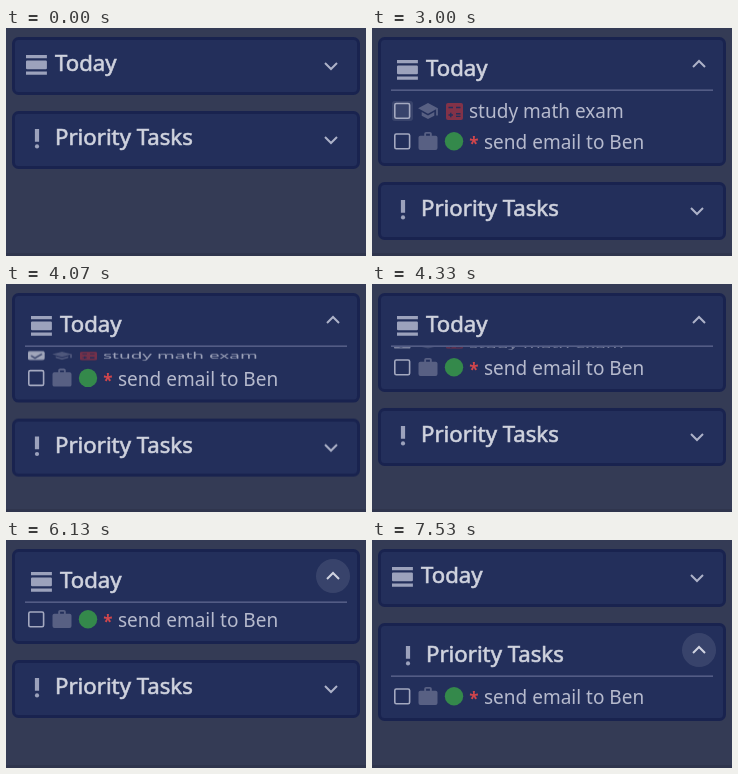
These frames come from a looping animation (360x228 px, 8000 ms). An HTML page:

```html
<!DOCTYPE html>
<html lang="en">
<head>
<meta charset="utf-8">
<title>Task list</title>
<style>
  @property --shift { syntax: "<length>"; inherits: true; initial-value: 0px; }

  html, body { margin: 0; width: 100%; height: 100%; overflow: hidden; background: #343b55; }
  svg {
    display: block; width: 360px; height: 228px;
    font-family: "Noto Sans", "Open Sans", sans-serif;
    animation: shift 8s step-end infinite;
  }

  .card { fill: #232f5b; stroke: #19234f; stroke-width: 3; }
  /* The thin outline gives a medium weight. */
  .title { font-size: 22.2px; fill: #d0d3de; stroke: #d0d3de; stroke-width: .6; }
  .task { font-size: 19px; fill: #b6bacd; }
  .star { font-size: 17px; font-weight: 700; fill: #d2464c; }
  .icon { fill: #9ca2bc; }
  .dim { fill: #586083; }
  .rule { fill: #606890; }
  .box { fill: none; stroke: #a4a9c0; stroke-width: 1.6; }
  .chevron { fill: none; stroke: #adb2c8; stroke-width: 2; }
  .halo { fill: #fff; opacity: 0; }

  .today *, .priority * { animation: 8s step-end infinite; }

  /* Height gained by the first card; everything below follows it. */
  @keyframes shift {
    0% { --shift: 0px; }
    14.125% { --shift: 71px; }
    45.875% { --shift: 71px; animation-timing-function: linear; }
    49.125% { --shift: 65px; animation-timing-function: linear; }
    51.625% { --shift: 46px; animation-timing-function: linear; }
    53.375% { --shift: 44px; animation-timing-function: linear; }
    54.125% { --shift: 41px; animation-timing-function: ease-out; }
    61.625% { --shift: 37px; }
    78.375% { --shift: 0px; }
  }

  .today .card { height: calc(55px + var(--shift)); }
  .today .second { transform: translateY(calc(var(--shift) + 34px)); }
  .priority { transform: translateY(calc(74px + var(--shift))); }

  .today .head { animation-name: today-head; }
  .today .body { animation-name: today-body; }
  .today .arrow { animation-name: today-arrow; }
  .today .chevron { animation-name: today-glow; }
  .today .hover { animation-name: today-hover; }
  .today .ripple { animation-name: ripple; }
  .today .first { transform-origin: 0 0; animation-name: collapse; }
  .today .focus { animation-name: focus; }
  .today .checked { opacity: 0; animation-name: check; }

  .priority .card { height: 55px; animation-name: priority-card; }
  .priority .head { animation-name: priority-head; }
  .priority .body { animation-name: priority-body; }
  .priority .arrow { animation-name: priority-arrow; }
  .priority .chevron { animation-name: priority-glow; }
  .priority .hover { animation-name: priority-hover; }

  @keyframes today-head {
    0%, 78.375% { transform: none; }
    14.125% { transform: translate(5px, 5px); }
  }
  @keyframes today-body {
    0%, 78.375% { opacity: 0; }
    14.125% { opacity: 1; }
  }
  @keyframes today-arrow {
    0%, 78.375% { transform: translate(325px, 38px); }
    14.125% { transform: translate(327px, 36px) rotate(180deg); }
  }
  @keyframes today-glow {
    0%, 25%, 83.375% { stroke: #adb2c8; }
    6.625%, 18.375%, 23.375%, 71.625% { stroke: #bfc3d4; }
    10%, 73.375% { stroke: #d0d3e0; }
  }
  @keyframes today-hover {
    0% { opacity: 0; }
    76.625% { opacity: .1; }
    81.625% { opacity: .07; }
    82.5% { opacity: .03; }
    83.375% { opacity: 0; }
  }
  @keyframes ripple {
    0%, 16.625% { opacity: 0; }
    15.875% { opacity: .06; }
  }
  @keyframes collapse {
    0% { transform: translateY(83px); opacity: 1; }
    45.875% { transform: translateY(83px); opacity: 1; animation-timing-function: linear; }
    49.125% { transform: translateY(77.5px) scaleY(.55); opacity: .95; animation-timing-function: linear; }
    54.125% { transform: translateY(61px) scaleY(.4); opacity: .65; animation-timing-function: ease-out; }
    61.625%, 100% { transform: translateY(57px) scaleY(0); opacity: 0; }
  }
  @keyframes focus {
    0%, 45.875% { opacity: 0; }
    37.5% { opacity: .1; }
  }
  @keyframes check {
    0% { opacity: 0; }
    44.125%, 100% { opacity: 1; }
  }

  @keyframes priority-card {
    0% { height: 55px; }
    90.875%, 100% { height: 95px; }
  }
  @keyframes priority-head {
    0% { transform: none; }
    90.875%, 100% { transform: translate(5px, 5px); }
  }
  @keyframes priority-body {
    0% { opacity: 0; }
    90.875%, 100% { opacity: 1; }
  }
  @keyframes priority-arrow {
    0% { transform: translate(325px, 38px); }
    90.875%, 100% { transform: translate(327px, 36px) rotate(180deg); }
  }
  @keyframes priority-glow {
    0% { stroke: #adb2c8; }
    85.875%, 100% { stroke: #d0d3e0; }
  }
  @keyframes priority-hover {
    0% { opacity: 0; }
    89.125%, 100% { opacity: .1; }
  }
</style>
</head>
<body>
<svg viewBox="0 0 360 228">
  <defs>
    <clipPath id="below-rule"><rect y="63" width="360" height="165"/></clipPath>
    <!-- Rows are drawn around their vertical centre. -->
    <g id="email">
      <rect class="box" x="22.8" y="-8" width="14.8" height="14.8" rx="1.5"/>
      <path class="dim" transform="translate(44.6 -12) scale(.95)"
        d="M20 6h-4V4a2 2 0 0 0-2-2h-4a2 2 0 0 0-2 2v2H4a2 2 0 0 0-2 2v11a2 2 0 0 0 2 2h16a2 2 0 0 0 2-2V8a2 2 0 0 0-2-2zm-6 0h-4V4h4z"/>
      <circle cx="82" cy="-.7" r="9.2" fill="#34894b"/>
      <text class="star" x="97.3" y="8">*</text>
      <text class="task" x="112" y="7">send email to Ben</text>
    </g>
  </defs>

  <rect width="360" height="228" fill="#343b55"/>
  <rect y="225" width="360" height="3" fill="#2f354d"/>

  <g class="today">
    <rect class="card" x="7.5" y="10.5" width="345" rx="5"/>
    <g class="head">
      <path class="icon" transform="translate(17.8 23.7) scale(1.1)"
        d="M2 3h19v3H2zM2 18h19v3H2zM3 8h17a1 1 0 0 1 1 1v6a1 1 0 0 1-1 1H3a1 1 0 0 1-1-1V9a1 1 0 0 1 1-1z"/>
      <text class="title" x="49" y="43">Today</text>
    </g>
    <circle class="halo ripple" cx="322" cy="40" r="20"/>
    <g class="arrow">
      <circle class="halo hover" r="17"/>
      <path class="chevron" d="M-6-3L0 3L6-3"/>
    </g>
    <g class="body">
      <rect class="rule" x="19" y="61.5" width="322" height="1.3"/>
      <g clip-path="url(#below-rule)">
        <g class="first">
          <rect class="halo focus" x="20" y="-10" width="21" height="20" rx="3"/>
          <rect class="box" x="22.8" y="-7.5" width="14.8" height="14.8" rx="1.5"/>
          <g class="checked">
            <rect x="22" y="-8.3" width="16.5" height="16.5" rx="2" fill="#b9bdcd"/>
            <path d="M25 0l4 4.5 7-8" fill="none" stroke="#232f5b" stroke-width="2"/>
          </g>
          <path class="dim" transform="translate(45.2 -10.8) scale(.9)"
            d="M5 13.2v4L12 21l7-3.8v-4L12 17zM12 3L1 9l11 6 9-4.9V17h2V9z"/>
          <rect x="74" y="-8" width="17" height="17" rx="2" fill="#823248"/>
          <path d="M76.5-3.5h4.5M84-3.5h4.5M78.8 1.7v4.6M76.5 4h4.5M84 2.8h4.5M84 5.4h4.5" stroke="#232f5b" stroke-width="1.4"/>
          <text class="task" x="97" y="7">study math exam</text>
        </g>
        <g class="second"><use href="#email" y="9"/></g>
      </g>
    </g>
  </g>

  <g class="priority">
    <rect class="card" x="7.5" y="10.5" width="345" rx="5"/>
    <g class="head">
      <path class="icon" d="M28.9 27h4.2v12.7h-4.2z"/>
      <circle class="icon" cx="31" cy="44.4" r="2.1"/>
      <text class="title" x="49" y="43">Priority Tasks</text>
    </g>
    <g class="arrow">
      <circle class="halo hover" r="17"/>
      <path class="chevron" d="M-6-3L0 3L6-3"/>
    </g>
    <g class="body">
      <rect class="rule" x="19" y="61.5" width="322" height="1.3"/>
      <use href="#email" y="83"/>
    </g>
  </g>
</svg>
</body>
</html>
```
